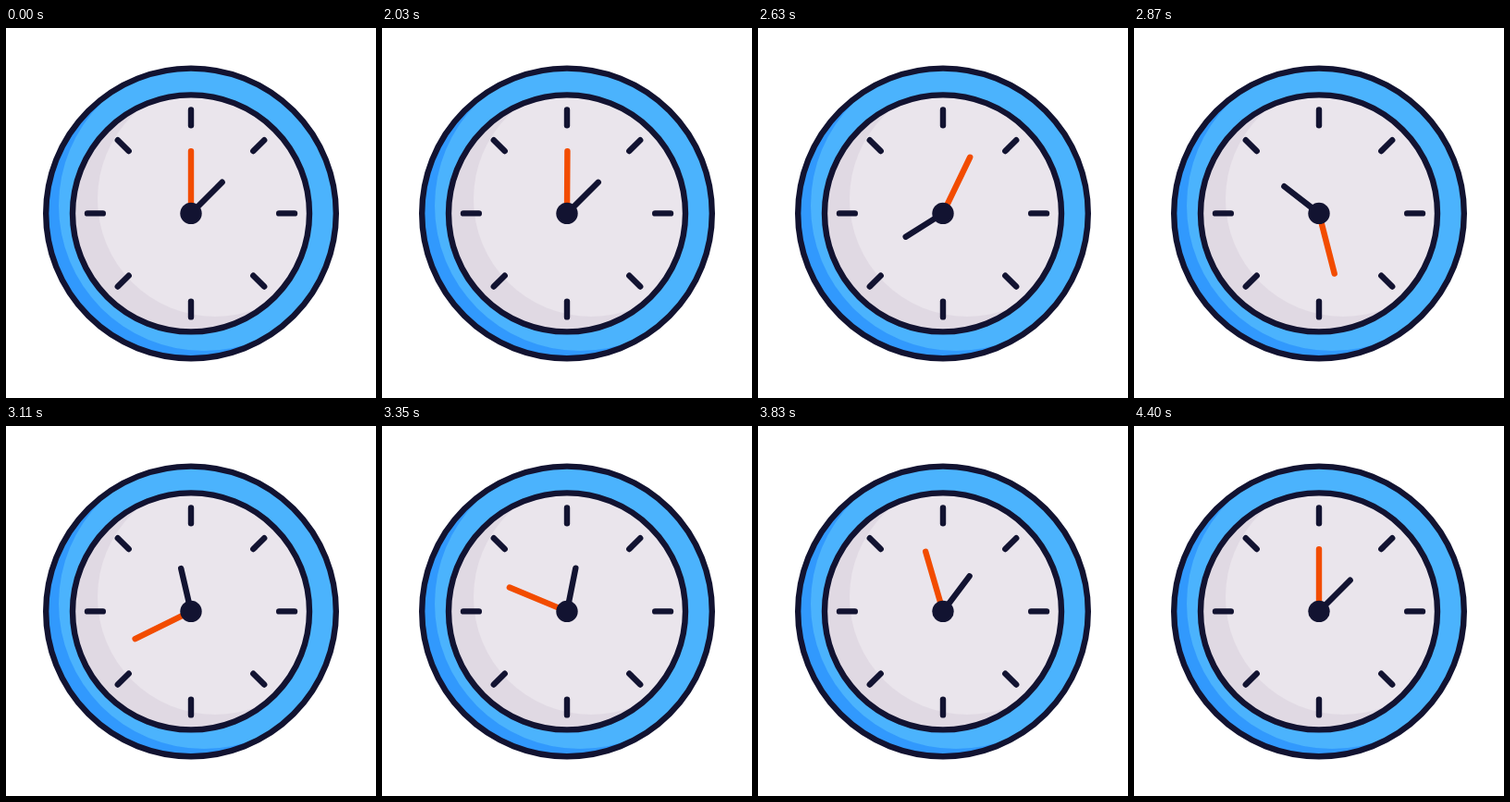
These frames come from a looping animation (400 by 400 pixels, 4430 ms). An HTML page:

```html
<!DOCTYPE html>
<html lang="en">
<head>
<meta charset="utf-8">
<title>Clock</title>
<style>
  html, body { margin: 0; height: 100%; overflow: hidden; background: #fff; }
  svg { display: block; width: 100vw; height: 100vh; }
  .line { fill: none; stroke: #121331; stroke-width: 6.4; stroke-linecap: round; }
</style>
</head>
<body>
<svg viewBox="0 0 400 400">
  <clipPath id="rim"><circle r="157"/></clipPath>
  <clipPath id="dial"><circle r="128"/></clipPath>
  <g transform="translate(200 200.4)">
    <g clip-path="url(#rim)">
      <circle r="157" fill="#3199fd"/>
      <circle cx="14" cy="-8.5" r="157" fill="#4bb3fd"/>
    </g>
    <g clip-path="url(#dial)">
      <circle r="128" fill="#e0d9e3"/>
      <circle cx="26" cy="-15.5" r="127" fill="#eae5ec"/>
    </g>
    <circle class="line" r="156.8"/>
    <circle class="line" r="128"/>
    <g id="ticks"></g>
    <path id="minute" class="line" d="M0 0V-67.3" style="stroke:#f24c00"/>
    <path id="hour" class="line" d="M0 0V-47.6"/>
    <circle r="11.7" fill="#121331"/>
  </g>
</svg>
<script>
const LOOP = 4430, START = 2000, DURATION = 2400, FIRST_STEP = 2030, STEP = 30;
const el = id => document.getElementById(id);
const rotate = (id, degrees) => el(id).setAttribute('transform', `rotate(${degrees})`);

el('ticks').innerHTML = Array.from({ length: 8 }, (_, i) =>
  `<path class="line" d="M0-95.2V-112" transform="rotate(${i * 45})"/>`).join('');

// cubic-bezier(1/3, 0, 0, 1), solved by bisection
function ease(x) {
  let low = 0, high = 1;
  for (let i = 0; i < 30; i++) {
    const s = (low + high) / 2;
    if (s * (1 - s) ** 2 + s ** 3 < x) low = s; else high = s;
  }
  return low * low * (3 - 2 * low);
}

function draw(now) {
  const t = now % LOOP;
  const stepped = FIRST_STEP + Math.floor((t - FIRST_STEP) / STEP) * STEP;
  const p = t < FIRST_STEP ? 0 : ease(Math.min(1, (stepped - START) / DURATION));
  rotate('minute', 720 * p);
  rotate('hour', 45 + 360 * p);
  requestAnimationFrame(draw);
}
draw(0);
</script>
</body>
</html>
```
